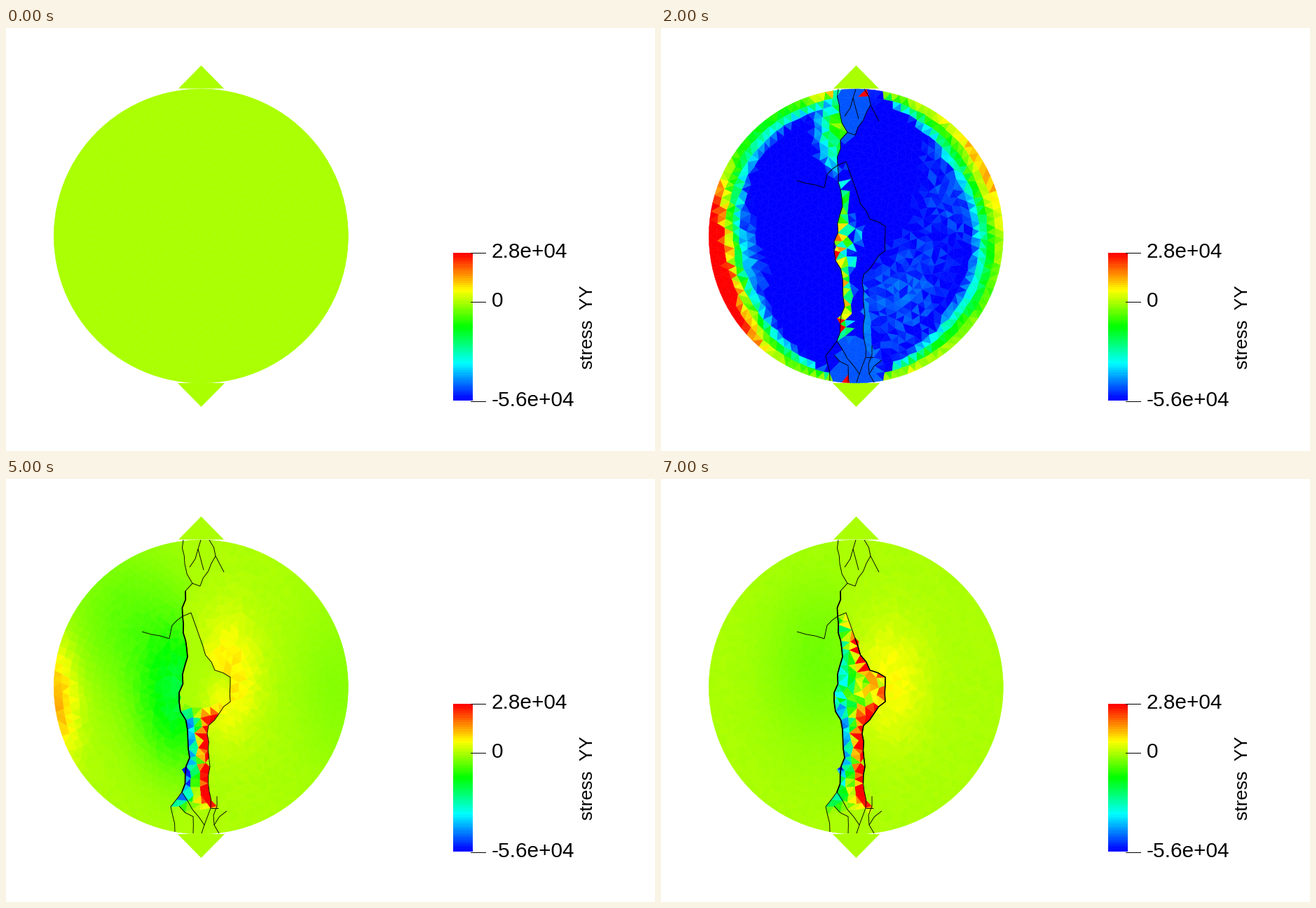
A matplotlib script that plays this animation: 926 by 604 pixels, repeating every 8 s.

```python
import numpy as np
import matplotlib.pyplot as plt
from matplotlib.animation import FuncAnimation
from matplotlib.collections import LineCollection, PolyCollection
from matplotlib.colors import hsv_to_rgb
from matplotlib.patches import Polygon
from matplotlib.tri import Triangulation

W, H, DPI = 926, 604, 64
CX, CY, R = 278.3, 297, 210
LOW, HIGH = -5.6, 2.8  # stress range in 1e4 units
CELL = 12.3            # mesh edge length
rng = np.random.default_rng(4)


def px(size):
    return size * 72 / DPI


def rainbow(v):
    t = np.clip((np.asarray(v) - LOW) / (HIGH - LOW), 0, 1)
    one = np.ones_like(t)
    return hsv_to_rgb(np.stack([(1 - t) * 2 / 3, one, one], -1))


def crack(*keys, jag=2.5):
    """Jagged path through the key points, one vertex per mesh cell."""
    path = [np.array(keys[0], float)]
    for a, b in zip(np.array(keys, float), np.array(keys[1:], float)):
        d = b - a
        n = max(1, round(np.hypot(*d) / CELL))
        side = np.array([-d[1], d[0]]) / np.hypot(*d)
        for k in range(1, n + 1):
            bend = rng.uniform(-jag, jag) if k < n else 0
            path.append(a + d * k / n + side * bend)
    return np.array(path)


top_l = crack((253, 87), (255, 121), (266, 149))
top_r = crack((290, 87), (299, 110), (277, 153))
main_l = crack((266, 149), (256, 160), (252, 196), (259, 254), (247, 318),
               (259, 358), (262, 398), (251, 447))
main_r = crack((252, 196), (264, 191), (281, 239), (298, 273), (320, 283),
               (320, 318), (289, 352), (290, 446), (292, 470))
low_l = crack((251, 447), (235, 468), (241, 504))
low_r = crack((301, 453), (297, 494), (304, 506))
twigs = [
    crack((266, 149), (277, 153)),
    crack((299, 110), (311, 133), jag=0),
    crack((278, 87), (274, 100), (282, 130), jag=0),
    crack((274, 100), (262, 126)),
    crack((252, 196), (237, 209), (233, 228), (194, 218), jag=1),
    crack((251, 447), (266, 472), (283, 494), (279, 506)),
    crack((247, 467), (267, 482), (267, 506)),
    crack((292, 470), (283, 494)),
    crack((292, 470), (303, 470)),
    crack((315, 474), (297, 494)),
]
paths = [top_l, top_r, main_l, main_r, low_l, low_r] + twigs


def ring(r, n, phase=0.0):
    a = np.pi + phase + np.arange(n) * 2 * np.pi / n
    return np.c_[CX + r * np.cos(a), CY + r * np.sin(a)]


def build_mesh():
    rings = []
    for i in range(1, 19):
        r = R - 11.1 * i
        n = max(4, int(2 * np.pi * r / CELL))
        rings.append(ring(r, n, i * np.pi / n) + rng.normal(0, min(0.3 * i, 1.2), (n, 2)))
    inner = np.vstack(rings)
    cuts = np.unique(np.vstack(paths), axis=0)
    cuts = cuts[np.hypot(*(cuts - (CX, CY)).T) < R - 4]
    gap = np.linalg.norm(inner[:, None] - cuts, axis=2).min(1)
    pts = np.vstack([ring(R, 111), inner[gap > 7], cuts])
    return pts[Triangulation(*pts.T).triangles]


tris = build_mesh()
X, Y = tris.mean(1).T
NOISE = rng.uniform(-1, 1, len(X))


def x_at(*parts):
    p = np.vstack(parts)
    p = p[np.argsort(p[:, 1], kind="stable")]
    return np.interp(Y, p[:, 1], p[:, 0])


# The shard lies between the two main cracks
XL = x_at(top_l, main_l[1:], low_l[1:])
closed = main_l[(main_l[:, 1] > 154) & (main_l[:, 1] < 190)]
XR = np.maximum(XL, x_at(top_r, closed, main_r[1:-1], low_r[1:]))
LEFT, RIGHT = X < XL, X > XR
ACROSS = np.clip((X - XL) / np.maximum(XR - XL, 1), 0, 1)


def bump(x, y, sx, sy, peak, lean=0):
    dx, dy = (X - x - lean * (Y - y)) / sx, (Y - y) / sy
    return peak * np.exp(-(dx * dx + dy * dy) / 2)


def bent(y0, y1, left, right, spread=1.1):
    """Shard stress running from its left to its right side."""
    fade = np.clip((Y - y0) / 15, 0, 1) * np.clip((y1 - Y) / 15, 0, 1)
    return fade * (left + (right - left) * ACROSS + spread * NOISE)


def join(left, right, shard):
    v = np.where(LEFT, left, right) * (1 + 0.13 * NOISE) + 0.04 * NOISE
    return np.where(LEFT | RIGHT, v, shard)


def squeezed():
    depth = R - np.hypot(X - CX, Y - CY)
    angle = np.arctan2(abs(X - CX), abs(Y - CY))
    width = 36 * np.sqrt(np.clip((angle - 0.17) / 0.7, 1e-4, 1))
    v = 0.5 * NOISE - 6.5 * np.clip((depth - 3) / width, 0, 1.2) ** 1.35
    v[angle < 0.17] = -7
    for side in (-1, 1):  # one torn cell under each wedge
        v[np.argmin(np.hypot(X - CX - 12.5 * side, Y - CY + 204.5 * side))] = 4
    return v


def build_states():
    squeeze = squeezed()
    wave = join(
        bump(60, 345, 45, 100, 6, 0.2) + bump(205, 290, 42, 125, -1.7)
        + bump(248, 325, 26, 46, -5.5) + bump(135, 165, 40, 50, -1.3)
        + bump(250, 150, 22, 45, 4.8),
        bump(465, 200, 60, 75, 1.3) + bump(300, 205, 38, 75, -1.4)
        + bump(340, 375, 45, 65, 0.9) + bump(475, 385, 40, 60, -0.8),
        bent(198, 445, 7.5, -9.5, 2) + bump(316, 298, 14, 24, 5))
    swing = join(
        bump(188, 222, 24, 44, 3.5) + bump(210, 160, 45, 50, 0.9)
        + bump(75, 210, 40, 75, -3.6) + bump(235, 370, 60, 70, -0.8),
        bump(410, 270, 75, 100, -0.8) + bump(300, 400, 50, 60, -0.5)
        + bump(290, 200, 28, 60, 0.5),
        bent(318, 470, -5, 5) + bump(306, 310, 16, 30, 1.3))
    settle = join(
        bump(248, 310, 42, 70, -1.7) + bump(170, 200, 60, 75, -0.6)
        + bump(62, 325, 25, 65, 1.6),
        bump(318, 280, 30, 60, 0.9) + bump(470, 300, 40, 90, -0.3),
        bent(325, 472, -6, 5.5) + bump(308, 315, 16, 22, 0.6))
    rest = join(
        bump(225, 265, 55, 85, -0.5),
        bump(328, 290, 35, 60, 0.7),
        bent(195, 475, -3.5, 3.6) + bent(320, 425, -2.5, 2, 0)
        + bump(314, 297, 15, 30, -1.7))
    return [0 * X, squeeze, 0.7 * squeeze + wave, wave, swing, settle,
            (settle + rest) / 2, rest]


colors = [rainbow(v) for v in build_states()]

fig = plt.figure(figsize=(W / DPI, H / DPI), dpi=DPI, facecolor="white")
ax = fig.add_axes([0, 0, 1, 1])

# Colour scale
bands = rainbow(np.linspace(HIGH, LOW, 64))[:, None]
ax.imshow(bands, extent=(638, 666, 532, 321), aspect="auto", interpolation="nearest")
for y, label in [(320.5, "2.8e+04"), (390.5, "0"), (532.5, "-5.6e+04")]:
    ax.plot([663, 684], [y, y], color="black", lw=px(1))
    ax.text(692.5, y + 7.5, label, family="Liberation Sans", size=px(29.7))
ax.text(837, 487, "stress  YY", family="Liberation Sans", size=px(26.4),
        rotation=90, rotation_mode="anchor")

# Loading wedges
for base, tip, half in [(86.5, 53.5, 32.5), (507, 541, 33.5)]:
    corners = [(278.5 - half, base), (278.5 + half, base), (278.5, tip)]
    ax.add_patch(Polygon(corners, fc=rainbow(0), lw=0))

disc = PolyCollection(tris, linewidths=px(0.5))
thin = LineCollection(paths, colors="black", linewidths=px(0.9))
thick = LineCollection([main_l[1:]], colors="black", linewidths=px(1.7))
bulge = LineCollection([main_r[4:-3]], colors="black", linewidths=px(1.5))
for part in (disc, thin, thick, bulge):
    ax.add_collection(part)

ax.set_xlim(0, W)
ax.set_ylim(H, 0)
ax.axis("off")


def draw(i):
    disc.set_facecolor(colors[i])
    disc.set_edgecolor(colors[i])
    # The disc splits, the main crack opens, then the shard comes loose
    for part, start in [(thin, 2), (thick, 3), (bulge, 6)]:
        part.set_visible(i >= start)
    return disc, thin, thick, bulge


anim = FuncAnimation(fig, draw, frames=8, interval=1000, repeat=True, repeat_delay=0)
plt.show()
```
